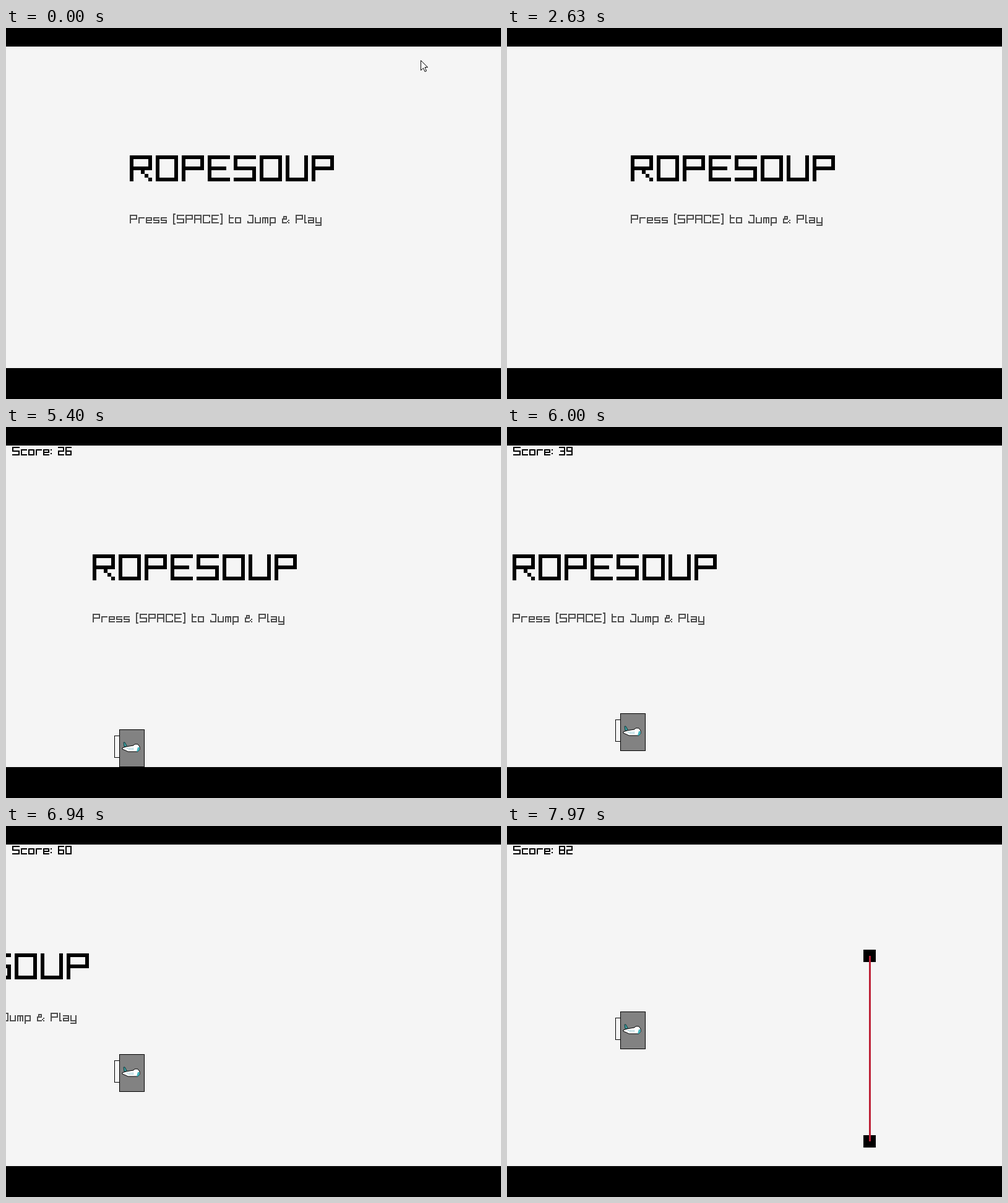
An HTML page with a canvas that plays this animation: 800x600 px, repeating every 8000 ms.

```html
<!DOCTYPE html>
<html lang="en">
<head>
<meta charset="utf-8">
<title>Ropesoup</title>
<style>
  html, body { margin: 0; width: 100%; height: 100%; overflow: hidden; background: #000; }
  canvas { display: block; }
</style>
</head>
<body>
<canvas id="stage" width="800" height="600" role="img"
  aria-label="ROPESOUP. Press [SPACE] to Jump &amp; Play">ROPESOUP. Press [SPACE] to Jump &amp; Play</canvas>
<script>
const ctx = document.getElementById('stage').getContext('2d');
const LOOP = 8000;
const START = 4100;      // the cup drives in
const SPEED = 0.2182;    // px per ms
const GRAVITY = 0.00094; // px per ms squared
const FOLLOW_X = 183;    // the camera holds the cup here
const GATE_X = 1197;
const ARROW_END = 1130;
const PAPER = '#f5f5f5';

// Pixel type: width and a stroke on a one-unit grid, cap height 7.
const GLYPHS = {
  ' ': [3, ''],
  '&': [6, 'M1 3V1H3V3H0V6H3M5 4h.01M4 5h.01M5 6h.01'],
  '[': [2, 'M1 -1H0V7H1'],
  ']': [2, 'M0 -1H1V7H0'],
  ':': [1, 'M0 2h.01M0 5h.01'],
  '0': [5, 'M0 0H4V6H0Z'],
  '1': [2, 'M0 0H1V6'],
  '2': [5, 'M0 0H4V3H0V6H4'],
  '3': [5, 'M0 0H4V6H0M1 3H4'],
  '4': [5, 'M0 0V3H4M4 0V6'],
  '5': [5, 'M4 0H0V3H4V6H0'],
  '6': [5, 'M4 0H0V6H4V3H0'],
  '7': [5, 'M0 0H4V6'],
  '8': [5, 'M0 0H4V6H0ZM0 3H4'],
  '9': [5, 'M4 3H0V0H4V6H0'],
  A: [6, 'M0 6V0H5V6M0 3H5'],
  C: [6, 'M5 1V0H0V6H5V5'],
  E: [6, 'M5 0H0V6H5M0 3H4'],
  J: [5, 'M1 0H4V6H0V5'],
  O: [6, 'M0 0H5V6H0Z'],
  P: [6, 'M0 6V0H5V3H0'],
  R: [6, 'M0 6V0H5V3H0M3 4h.01M4 5h.01M5 6h.01'],
  S: [6, 'M5 0H0V3H5V6H0'],
  U: [6, 'M0 0V6H5V0'],
  a: [5, 'M0 2H4V6H0V4H4'],
  c: [5, 'M4 2H0V6H4'],
  e: [5, 'M4 6H0V2H4V4H0'],
  l: [2, 'M0 0V6H1'],
  m: [5, 'M0 6V2H4V6M2 2V6'],
  o: [5, 'M0 2H4V6H0Z'],
  p: [5, 'M0 8V2H4V6H0'],
  r: [5, 'M0 6V2H4'],
  s: [5, 'M4 2H0V4H4V6H0'],
  t: [4, 'M0 0V6H3M0 2H3'],
  u: [5, 'M0 2V6H4V2'],
  y: [5, 'M0 2V6H4M4 2V8H0']
};
for (const glyph of Object.values(GLYPHS)) glyph[1] = new Path2D(glyph[1]);

const plane = {
  body: new Path2D('M5 30L11 28L23 26L25 24H30L33 28V33L30 36H14L10 34L5 32Z'),
  tail: new Path2D('M7 21H9L13 28H8Z'),
  nose: new Path2D('M30 29H33V33L30 36H28Z'),
  windows: new Path2D('M12 30.5H23M15 32.5H24')
};
const arrow = new Path2D('M.5 .5V16.5L4.5 12.8L7 18.5L9.5 17.5L7 11.5H11.5Z');

function write(text, x, y, size, color) {
  ctx.save();
  ctx.translate(x, y);
  ctx.scale(size, size);
  ctx.translate(0.5, 0.5);
  ctx.strokeStyle = color;
  ctx.lineWidth = 1;
  ctx.lineCap = 'square';
  for (const ch of text) {
    const [width, path] = GLYPHS[ch];
    ctx.stroke(path);
    ctx.translate(width + 1, 0);
  }
  ctx.restore();
}

function box(x, y, w, h, fill) {
  ctx.fillStyle = fill;
  ctx.fillRect(x, y, w, h);
}

function framed(x, y, w, h, fill) {
  box(x, y, w, h, '#000');
  box(x + 1, y + 1, w - 2, h - 2, fill);
}

function shape(path, fill, stroke) {
  ctx.lineWidth = 1;
  ctx.fillStyle = fill;
  ctx.fill(path);
  if (stroke) {
    ctx.strokeStyle = stroke;
    ctx.stroke(path);
  }
}

// Value at time t along [time, value] stops; blend(a, b, t0, t1) joins two stops.
function along(stops, t, blend) {
  if (t <= stops[0][0]) return stops[0][1];
  for (let i = 1; i < stops.length; i++) {
    const [t0, a] = stops[i - 1], [t1, b] = stops[i];
    if (t < t1) return blend(a, b, t - t0, t1 - t);
  }
  return stops[stops.length - 1][1];
}

// Each jump is thrown from one stop and falls freely to the next.
const hop = (a, b, since, left) =>
  a + (b - a) * since / (since + left) - GRAVITY / 2 * since * left;

const swing = (a, b, since, left) =>
  a + (b - a) * (1 - Math.cos(Math.PI * since / (since + left))) / 2;

const jumps = [[5820, 489], [6160, 466], [6355, 442], [6550, 418], [6745, 393],
  [6940, 369], [7285, 346], [7630, 323], [7970, 300]];
const arrowX = [[0, 670], [400, 205], [830, 722], [930, 724]];
const arrowY = [[0, 52], [400, 300], [830, 10], [930, 12]];

function drawCup(x, y) {
  framed(x - 8, y + 10, 10, 36, PAPER);
  framed(x, y, 41, 61, '#828282');
  ctx.save();
  ctx.translate(x, y);
  shape(plane.tail, '#3c9c9c', '#123c40');
  shape(plane.body, '#fff', '#000');
  shape(plane.nose, '#43b4bd');
  ctx.strokeStyle = '#7ab9c4';
  ctx.setLineDash([2, 1]);
  ctx.stroke(plane.windows);
  ctx.restore();
}

function drawGate(x) {
  box(x, 200, 20, 20, '#000');
  box(x, 500, 20, 20, '#000');
  box(x + 9, 210, 3, 300, '#be2137');
}

function drawArrow(t) {
  ctx.save();
  ctx.translate(Math.round(along(arrowX, t, swing)), Math.round(along(arrowY, t, swing)));
  shape(arrow, '#fff', '#000');
  ctx.restore();
}

function draw(t) {
  const left = Math.floor(-40 + SPEED * (t - START));
  const scroll = Math.max(0, left - FOLLOW_X);
  box(0, 0, 800, 600, '#000');
  box(0, 30, 800, 520, PAPER);
  write('ROPESOUP', 200 - scroll, 206, 6, '#000');
  write('Press [SPACE] to Jump & Play', 200 - scroll, 302, 2, '#505050');
  if (t >= START) {
    const score = left < 0 ? 0 : Math.floor((left + 21) / 10);
    drawGate(GATE_X - scroll);
    drawCup(left - scroll, Math.round(along(jumps, t, hop)));
    write('Score: ' + String(score).padStart(2, '0'), 10, 32, 2, '#000');
  }
  if (t < ARROW_END) drawArrow(t);
}

function tick() {
  draw(performance.now() % LOOP);
  requestAnimationFrame(tick);
}
tick();
</script>
</body>
</html>
```
